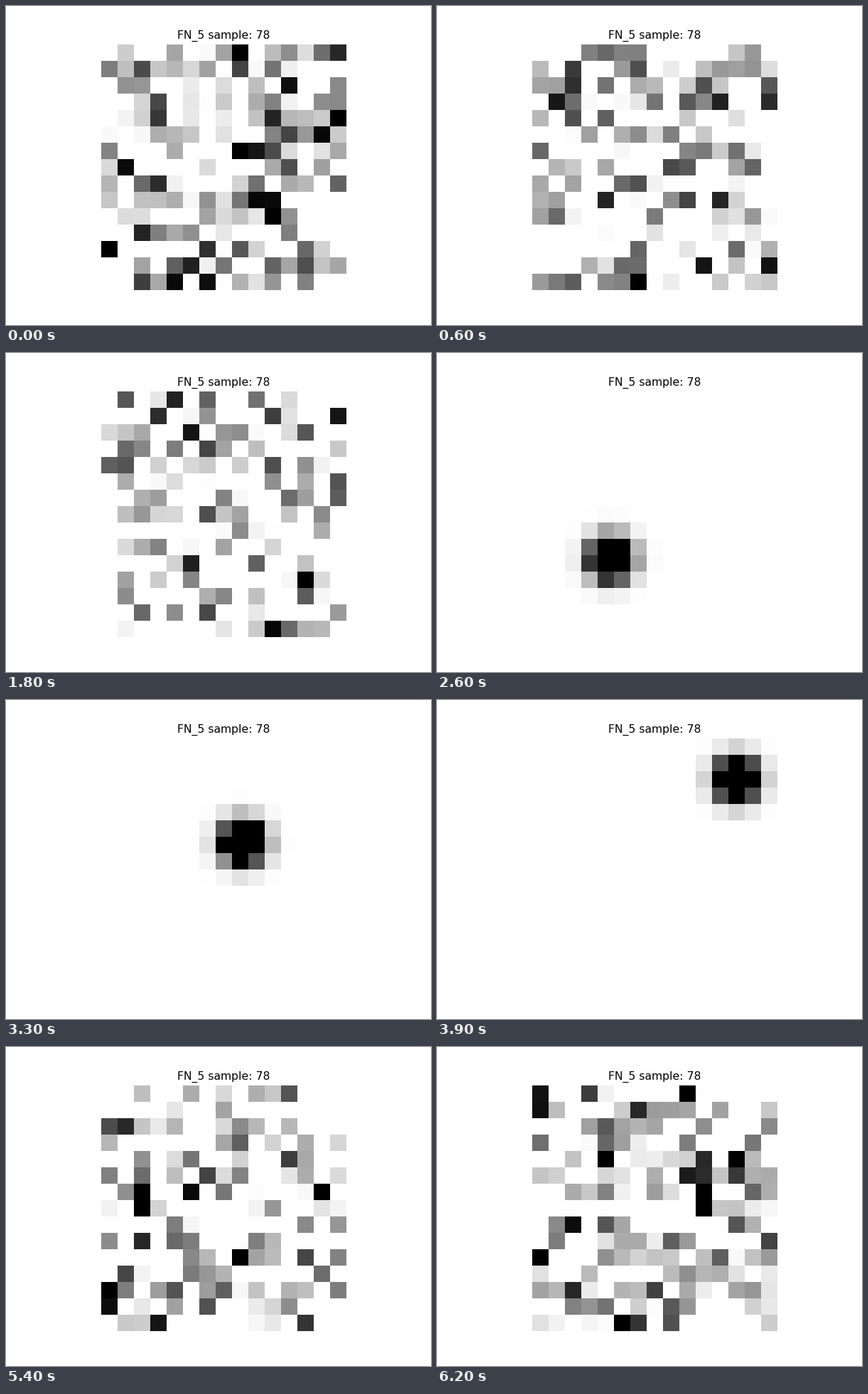
A matplotlib script that plays this animation: 598x448 px, repeating every 6.3 s.

```python
import numpy as np
import matplotlib.pyplot as plt
from matplotlib.animation import FuncAnimation

W, H, DPI = 598, 448, 64
FRAMES, INTERVAL = 63, 100
GRID = 15
BLOB_START, BLOB_END = 21, 43
STEPS = 17
SEED = 78

plt.rcParams["font.family"] = "DejaVu Sans"


def noise(i):
    """Half-normal ink: about half of the cells stay white."""
    rng = np.random.default_rng([SEED, i])
    return 1 - np.clip(rng.normal(0, 0.5, (GRID, GRID)), 0, 1)


def blob(i):
    """Clipped Gaussian on the rising diagonal, pausing every fifth tick."""
    step = i - BLOB_START - max(0, (i - BLOB_START - 1) // 5)
    cx = 0.455 + 13.09 * step / STEPS
    cy = GRID - 1 - cx
    row, col = np.mgrid[:GRID, :GRID]
    d2 = (col - cx) ** 2 + (row - cy) ** 2
    return 1 - np.clip(2.8 * np.exp(-0.7 * d2), 0, 1)


def cells(i):
    return blob(i) if BLOB_START <= i < BLOB_END else noise(i)


fig = plt.figure(figsize=(W / DPI, H / DPI), dpi=DPI, facecolor="white")
ax = fig.add_axes([0.125, 0.11, 0.775, 0.77])
image = ax.imshow(cells(0), cmap="gray", vmin=0, vmax=1, interpolation="nearest")
ax.set_axis_off()
ax.set_title("FN_5 sample: 78", fontsize=17.52, pad=8.76)


def update(i):
    image.set_data(cells(i))
    return (image,)


anim = FuncAnimation(fig, update, frames=FRAMES, interval=INTERVAL,
                     init_func=lambda: update(0), repeat=True, repeat_delay=0)
plt.show()
```
